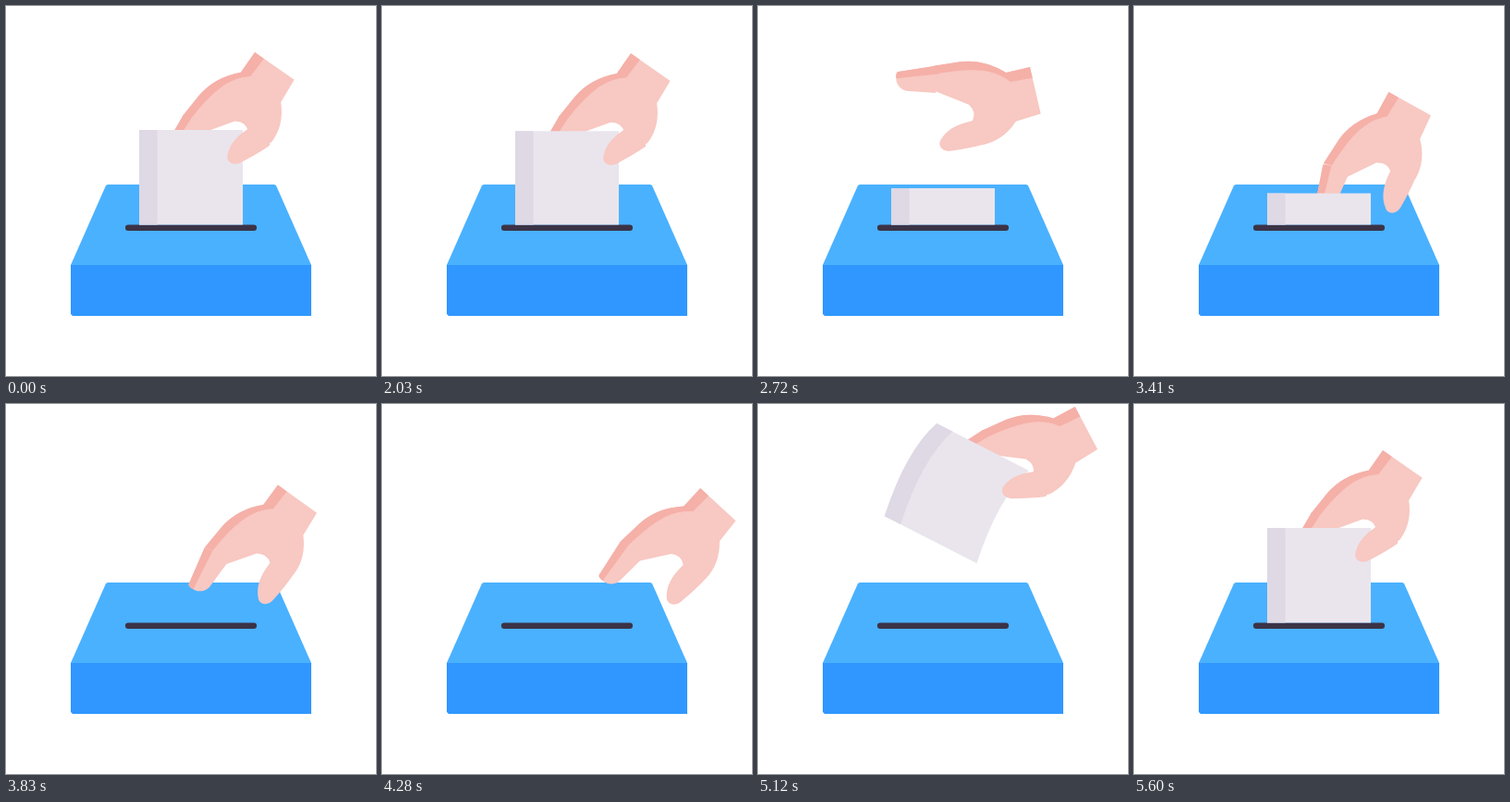
An HTML page with a canvas that plays this animation: 400x400 px, repeating every 5630 ms.

```html
<!DOCTYPE html>
<html lang="en">
<head>
<meta charset="utf-8">
<title>Ballot box</title>
<style>
  html, body { margin: 0; width: 100%; height: 100%; overflow: hidden; background: #fff; }
  canvas { display: block; width: 400px; height: 400px; }
</style>
</head>
<body>
<canvas id="stage" width="400" height="400"></canvas>
<script>
const ctx = document.getElementById('stage').getContext('2d');
const LOOP = 5630, HOLD = 2030, ARRIVAL = 4620;
const SKIN = '#f8c8c2', SHADOW = '#f5b0a8';

// The hand is a rigid palm with a bending thumb and finger.
// Its origin is the upper wrist corner, its x axis the cut of the wrist.
const PALM = 'M0 0H52L54 28Q71 46 70.5 68L66 84H48L42.5 73.5Q35 67 25 73.4L5 102' +
  'L-2 112H-18L-24.5 101L-22.5 72Q-20 47 0 26.5Z';
const PALM_SHADE = 'M0 0H12L11 24C-6 38 -13 56 -15.5 99L-24.5 101L-22.5 72Q-20 47 0 26.5Z';
const FINGER = 'M5 102L3.5 131C3.5 138 -2 145 -10 145Q-18 146 -17.5 141L-24.5 101Z';
const FINGER_SHADE = 'M-15.5 99L-10 145Q-18 146 -17.5 141L-24.5 101Z';
const THUMB = 'M70.5 68Q70.5 84 67.5 105C66 114 57 117 52.5 111Q40.5 99 42.5 73.5L56 60Z';

// Bends in degrees: thumb, finger.
const GRIP = [20, 5], OPEN = [-3, 14], PRESS = [-7, -8], RELAX = [0, 0];
const REST = { x: 269, y: 50, angle: 35 };

const key = (time, ...values) => ({ time, values });
const pose = (time, x, y, angle, bends) => key(time, x, y, angle, ...bends);
const rest = time => pose(time, REST.x, REST.y, REST.angle, GRIP);

const release = [
  rest(2000),
  pose(2380, 269, 113, 35, GRIP),
  pose(2480, 278, 100, 35, GRIP),
  pose(2720, 294, 66, 77, OPEN),
  pose(2950, 294, 59, 77, OPEN),
  pose(3410, 275.5, 93, 29, PRESS),
  pose(3560, 267, 113, 19, PRESS),
  pose(3980, 314, 77, 42.6, RELAX),
  pose(4280, 344, 91, 42.6, RELAX),
  pose(4550, 519, 166, 42.6, RELAX)
];
const sink = [key(2000, 0), key(2380, 63), key(3370, 63), key(3560, 108)];
const arrive = [
  pose(4620, 355, -90, 115, GRIP),
  pose(4700, 368, -50, 107, GRIP),
  pose(4900, 391, -23, 85, GRIP),
  pose(5270, 304, 19, 50, GRIP),
  rest(5600)
];

// Monotone cubic interpolation of every channel.
function sample(keys, time) {
  const last = keys.length - 1;
  if (time <= keys[0].time) return keys[0].values;
  if (time >= keys[last].time) return keys[last].values;
  const i = keys.findIndex(k => k.time > time) - 1;
  const span = keys[i + 1].time - keys[i].time;
  const u = (time - keys[i].time) / span;
  const ease = u * u * (3 - 2 * u);
  return keys[i].values.map((from, c) => {
    const slope = n => n < 0 || n >= last ? 0 :
      (keys[n + 1].values[c] - keys[n].values[c]) / (keys[n + 1].time - keys[n].time);
    const tangent = n => {
      const a = slope(n - 1), b = slope(n);
      return a * b <= 0 ? 0 : 2 * a * b / (a + b);
    };
    const to = keys[i + 1].values[c];
    return from + (to - from) * ease +
      span * u * (1 - u) * ((1 - u) * tangent(i) - u * tangent(i + 1));
  });
}

function fill(path, color) {
  ctx.fillStyle = color;
  ctx.fill(new Path2D(path));
}

function place(x, y, angle, draw) {
  ctx.save();
  ctx.translate(x, y);
  ctx.rotate(angle * Math.PI / 180);
  draw();
  ctx.restore();
}

function bend(jointX, jointY, angle, draw) {
  place(jointX, jointY, angle, () => {
    ctx.translate(-jointX, -jointY);
    draw();
  });
}

function drawBox() {
  fill('M110 193H290L292 194L330 280H70L108 194Z', '#4ab1ff');
  fill('M70 280H330V335H72L70 333Z', '#2f97ff');
  ctx.strokeStyle = '#3b3347';
  ctx.lineWidth = 6.5;
  ctx.lineCap = 'round';
  ctx.stroke(new Path2D('M132.2 239.7H267.8'));
}

function drawPalm([x, y, angle, , finger]) {
  place(x, y, angle, () => {
    fill(PALM, SKIN);
    bend(-10, 101, finger, () => {
      fill(FINGER, SKIN);
      fill(FINGER_SHADE, SHADOW);
    });
    fill(PALM_SHADE, SHADOW);
  });
}

function drawThumb([x, y, angle, thumb]) {
  place(x, y, angle, () => bend(56, 72, thumb, () => fill(THUMB, SKIN)));
}

// The sheet hangs from the hand and curls the further it is turned.
function drawPaper(x, y, angle) {
  const tilt = (angle - REST.angle) / 72;
  const curl = tilt * (3 * tilt - 2);
  const bulge = 50 * curl, sway = 14 * curl;
  const sheet = (left, right) => `M${left} 134H${right}Q${right + bulge} 175 ${right + sway} 249` +
    `H${left + sway}Q${left + bulge} 175 ${left} 134Z`;
  ctx.save();
  ctx.beginPath();
  ctx.rect(0, 0, 400, 236.5);
  ctx.clip();
  place(x, y, angle - REST.angle, () => {
    ctx.translate(-REST.x, -REST.y);
    fill(sheet(144, 256), '#eae5ed');
    fill(sheet(144, 163.5), '#dfd8e5');
  });
  ctx.restore();
}

function frame(now) {
  let time = now % LOOP;
  if (time < HOLD) time = 0;
  const arriving = time >= ARRIVAL;
  const hand = sample(arriving ? arrive : release, time);

  ctx.fillStyle = '#fff';
  ctx.fillRect(0, 0, 400, 400);
  drawBox();
  drawPalm(hand);
  if (arriving) drawPaper(hand[0], hand[1], hand[2]);
  else drawPaper(REST.x, REST.y + sample(sink, time)[0], REST.angle);
  drawThumb(hand);
}

const start = performance.now();
function tick() {
  frame(performance.now() - start);
  requestAnimationFrame(tick);
}
tick();
</script>
</body>
</html>
```
